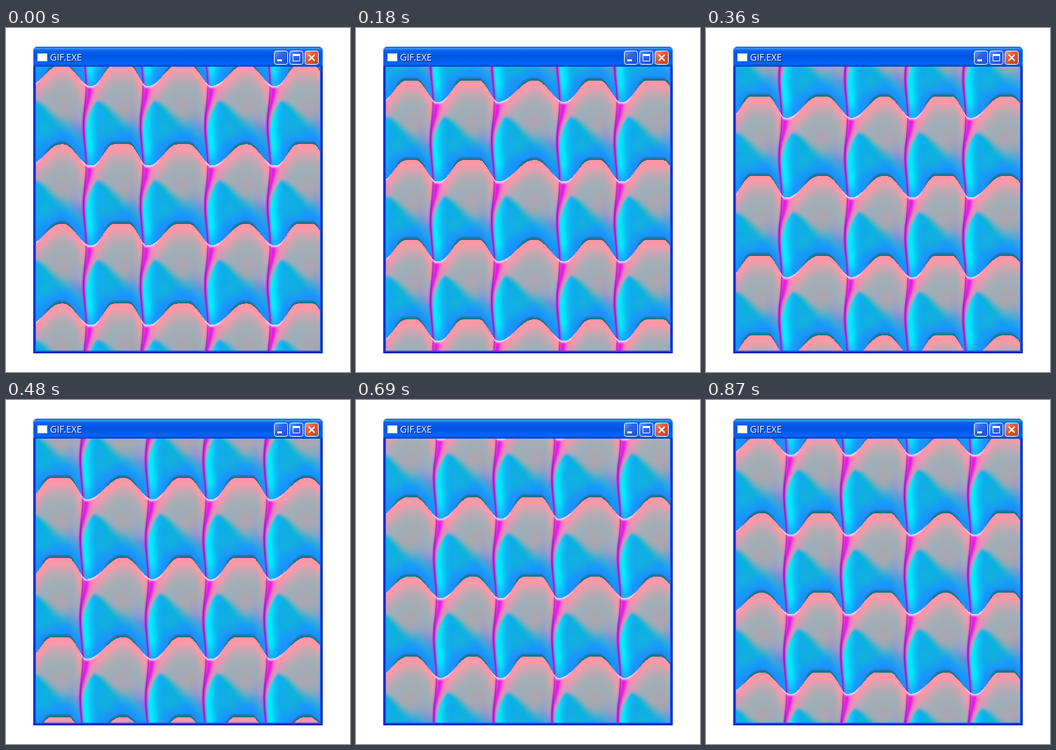
Animation, 516 px wide and 516 px high, one loop 900 ms. Source, as an HTML page with a canvas:

```html
<!DOCTYPE html>
<html>
<head>
<meta charset="utf-8">
<style>
  html, body { margin: 0; width: 516px; height: 516px; overflow: hidden; background: #fff; }
  svg, canvas { position: absolute; left: 0; top: 0; }
  canvas { left: 45px; top: 58px; }
  text { font: 500 14px "Open Sans", "Noto Sans", sans-serif; }
</style>
</head>
<body>
<svg width="516" height="516">
  <defs>
    <linearGradient id="bar" x2="0" y2="1">
      <stop offset="0" stop-color="#0a4fd0"/>
      <stop offset=".08" stop-color="#3a92ff"/>
      <stop offset=".2" stop-color="#0560f0"/>
      <stop offset=".5" stop-color="#0054e4"/>
      <stop offset=".85" stop-color="#0364fa"/>
      <stop offset="1" stop-color="#0140c4"/>
    </linearGradient>
    <linearGradient id="blue" x2="1" y2="1">
      <stop offset="0" stop-color="#6f9bfa"/>
      <stop offset=".4" stop-color="#2f66ea"/>
      <stop offset="1" stop-color="#1a50d8"/>
    </linearGradient>
    <linearGradient id="red" x2="1" y2="1">
      <stop offset="0" stop-color="#f4a08a"/>
      <stop offset=".4" stop-color="#e65a34"/>
      <stop offset="1" stop-color="#cc3d14"/>
    </linearGradient>
  </defs>
  <path d="M41 488V35q0-7 7-7h420q7 0 7 7v453z" fill="#0017a8"/>
  <path d="M42 487V57h432v430z" fill="#0528c8"/>
  <path d="M43 486V57h430v429z" fill="#0f50ea"/>
  <path d="M41 58V35q0-7 7-7h420q7 0 7 7v23z" fill="url(#bar)"/>
  <path d="M47 38h15v12h-15z" fill="#fff"/>
  <path d="M47 38.5h15M47.5 38v12M61.5 38v12M47 49.5h15" stroke="#c8dcff"/>
  <text x="67" y="50" fill="#001a70">GIF.EXE</text>
  <text x="66" y="49" fill="#fff">GIF.EXE</text>
  <g stroke="#fff">
    <rect x="402.5" y="34.5" width="20" height="20" rx="3" fill="url(#blue)"/>
    <rect x="425.5" y="34.5" width="20" height="20" rx="3" fill="url(#blue)"/>
    <rect x="448.5" y="34.5" width="20" height="20" rx="3" fill="url(#red)"/>
    <path d="M407 48.5h7" stroke-width="3"/>
    <path d="M430.5 40v9.5h10V40M430 40.5h11" fill="none"/>
    <path d="M430 40.5h11" stroke-width="3"/>
    <path d="M454 40l9 9m0-9l-9 9" stroke-width="2.2"/>
  </g>
</svg>
<canvas id="view" width="426" height="426"></canvas>
<script>
const SIZE = 426, PERIOD = 119.5, COLUMN = 92, DIP = 32, TAU = Math.PI * 2;
const LOOP = 900, STEPS = 25;
const ctx = document.getElementById('view').getContext('2d');
const cache = [];

const smooth = (a, b, x) => {
  const k = Math.min(1, Math.max(0, (x - a) / (b - a)));
  return k * k * (3 - 2 * k);
};
const bell = (x, w) => Math.exp(-(x / w) * (x / w));
const blend = (c, to, k) => {
  for (let j = 0; j < 3; j++) c[j] += (to[j] - c[j]) * k;
};

// Face colours by distance below the rim
const FACE = [
  [0, 255, 150, 164], [8, 250, 154, 168], [20, 196, 168, 178],
  [38, 158, 176, 184], [66, 146, 176, 190], [86, 74, 176, 210],
  [102, 34, 160, 242], [120, 26, 140, 250]
];
function faceColour(v) {
  let n = 1;
  while (n < FACE.length - 1 && FACE[n][0] < v) n++;
  const a = FACE[n - 1], b = FACE[n], k = (v - a[0]) / (b[0] - a[0]);
  return [1, 2, 3].map(j => a[j] + (b[j] - a[j]) * k);
}

// How domed a column is; the dome travels left across three columns
const dome = (col, t) => .5 + .5 * Math.cos(TAU * (t - .6 + col / 3));

// Drop of the scale's upper edge across a column, u = 0..1
function rim(u, col, t) {
  if (u < .07) { u++; col--; }
  const round = dome(col, t);
  return DIP * Math.max(
    1 - smooth(.1 - .04 * round, .5 + .12 * round, u),
    smooth(.8 - .14 * round, 1.06, u));
}

function shade(d, e, h, v, round) {
  const q = v + h;
  const c = faceColour(v);
  blend(c, [178, 164, 172], bell(d - 62, 20) * bell(q - 66, 24) * .8);
  blend(c, [255, 150, 168], smooth(14, 2, e) * smooth(75, 35, q) * .7);
  blend(c, [165, 105, 236], smooth(26, 0, e) * smooth(45, 85, v) * (.45 + .5 * round));
  blend(c, [255, 120, 190], bell(d - 4, 15) * smooth(95, 45, q) * .7);

  // Cool hollow below a curved ridge
  const side = Math.max(0, d - 20);
  const ridge = 54 + 50 * smooth(14, 85, d) + 65 * (Math.max(0, 20 - d) / 20) ** 2;
  const below = q - ridge;
  const soft = 4 + side * .3;
  const cool = [18, 168, 236];
  blend(cool, [26, 145, 255], smooth(84, 114, v));
  blend(cool, [0, 188, 208], smooth(0, 12, side) * bell(below, 16) * smooth(110, 75, v) * .75);
  blend(cool, [20, 182, 212], bell(d - 40, 14) * bell(q - 98, 14) * .6);
  blend(cool, [0, 238, 255], bell(d - 6, 10) * (1 - .6 * smooth(90, PERIOD, v)));
  blend(c, cool, smooth(-soft, soft, below));

  // Magenta fold along the seam
  const z = d < e ? d : -e;
  const low = smooth(35, 85, q);
  const fold = bell(z - 5 + 4.5 * low, 5 - 2.6 * low);
  blend(c, [232, 24, 232], fold * smooth(28, 38, q) * (1 - .35 * smooth(105, 140, q)));
  blend(c, [90, 20, 150], bell(z, 1) * .55);

  blend(c, [30, 112, 140], smooth(PERIOD - 7, PERIOD - 1, v) * smooth(22, 4, h));
  blend(c, [238, 225, 255], smooth(5, 0, v) * smooth(18, 30, h) * .9);
  return c;
}

function render(t) {
  const image = new ImageData(SIZE, SIZE);
  const top = 116 + PERIOD * t;
  const seam = (i, y) => 70 + COLUMN * i + 4 * Math.cos(TAU * (t - .87 + i / 3))
    + 2 * Math.cos(TAU * (y - top - DIP) / PERIOD);
  for (let y = 0, p = 0; y < SIZE; y++) {
    let col = -1, left = seam(-1, y), next = seam(0, y), round = dome(col, t);
    for (let x = 0; x < SIZE; x++, p += 4) {
      if (x >= next) {
        left = next;
        next = seam(++col + 1, y);
        round = dome(col, t);
      }
      const h = rim((x - left) / (next - left), col, t);
      const v = ((y - top - h) % PERIOD + PERIOD) % PERIOD;
      image.data.set([...shade(x - left, next - x, h, v, round), 255], p);
    }
  }
  return image;
}

// Five poses per 180 ms; the first of each group is held twice as long
function draw() {
  const ms = performance.now() % LOOP;
  const step = 5 * Math.floor(ms / 180) + Math.max(0, Math.floor(ms % 180 / 30) - 1);
  cache[step] ??= render(step / STEPS);
  ctx.putImageData(cache[step], 0, 0);
  requestAnimationFrame(draw);
}
draw();
</script>
</body>
</html>
```
